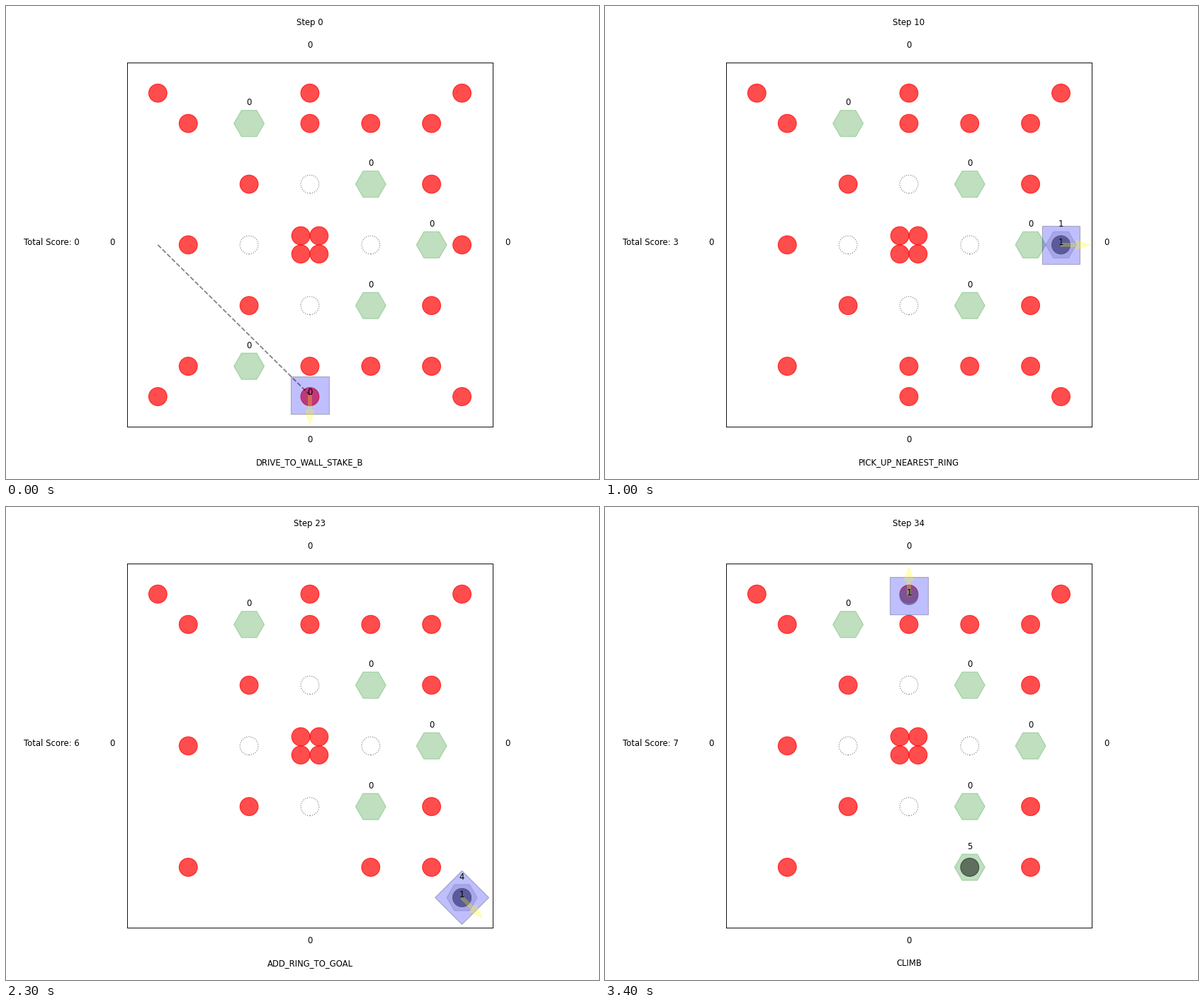
A matplotlib script for the animation above (3500 ms loop, 837 by 669 pixels).

```python
import matplotlib.pyplot as plt
import numpy as np
from matplotlib.animation import FuncAnimation
from matplotlib.patches import Circle, FancyArrow, Rectangle, RegularPolygon

W, H, DPI = 837, 669, 83.7
HALF = 6        # half the field side, in feet
WALL = 4.95     # where the robot stops in front of a wall
SIDE = 1.25
RING_R = 0.3
CLEARANCE = 1.37

RINGS = [(-5, 5), (0, 5), (5, 5), (-4, 4), (0, 4), (2, 4), (4, 4),
         (-2, 2), (4, 2), (-4, 0), (5, 0), (-2, -2), (4, -2),
         (-4, -4), (0, -4), (2, -4), (4, -4), (-5, -5), (0, -5), (5, -5),
         (-.3, .3), (.3, .3), (-.3, -.3), (.3, -.3)]
GOALS = [(-2, 4), (2, 2), (4, 0), (2, -2), (-2, -4)]
POLES = [(2, 0), (0, 2), (-2, 0), (0, -2)]
STEP = {"L": (-1, 0), "R": (1, 0), "T": (0, 1), "B": (0, -1)}

RING, GOAL = "PICK_UP_NEAREST_RING", "PICK_UP_NEAREST_GOAL"
ADD, ADD_WALL = "ADD_RING_TO_GOAL", "ADD_RING_TO_WALL_STAKE"
DROP, CLIMB = "DROP_GOAL", "CLIMB"


def wall(side):
    return "DRIVE_TO_WALL_STAKE_" + side


def corner(name):
    return "DRIVE_TO_CORNER_" + name


PLAN = [
    wall("B"), GOAL, corner("BR"), corner("TR"), wall("T"), corner("TL"),
    corner("BL"), RING, ADD, wall("R"), RING, wall("B"), wall("L"), ADD,
    wall("B"), RING, RING, wall("L"), wall("B"), wall("R"), corner("BR"),
    RING, ADD, ADD, ADD, DROP, GOAL, wall("B"), corner("BR"), wall("B"),
    ADD_WALL, RING, DROP, wall("T"), CLIMB,
]


def cross(a, b):
    return a[0] * b[1] - a[1] * b[0]


def heading(v):
    return np.arctan2(v[1], v[0])


def route(start, end):
    """Straight path, or the shortest one round the outside of a pole."""
    p, q = np.array(start, float), np.array(end, float)
    v = q - p
    for pole in POLES:
        c = np.array(pole, float)
        t = np.clip(np.dot(c - p, v) / np.dot(v, v), 0, 1)
        if np.hypot(*(p + t * v - c)) < CLEARANCE - 0.17:
            turn = np.sign(cross(v, -p))
            a = heading(p - c) + turn * np.arccos(CLEARANCE / np.hypot(*(p - c)))
            b = heading(q - c) - turn * np.arccos(CLEARANCE / np.hypot(*(q - c)))
            sweep = (turn * (b - a)) % (2 * np.pi)
            arc = a + turn * np.linspace(0, sweep, 30)
            bend = c + CLEARANCE * np.column_stack([np.cos(arc), np.sin(arc)])
            return np.vstack([p, bend, q])
    return np.vstack([p, q])


def simulate():
    pos, angle, held, score = (-5, 0), 0.0, 0, 0
    rings = list(RINGS)
    goals = [[g, 0] for g in GOALS]
    carried = None
    states = []

    def nearest(points):
        return min(points, key=lambda p: np.hypot(p[0] - pos[0], p[1] - pos[1]))

    def face(target):
        d = np.subtract(target, pos)
        return heading(d) if np.any(d) else angle

    for action in PLAN:
        path = None
        if action.startswith("DRIVE"):
            d = np.sum([STEP[s] for s in action.rsplit("_", 1)[1]], axis=0)
            end = tuple(WALL * d)
            path = route(pos, end)
            pos, angle = end, heading(d)
        elif action == RING:
            ring = nearest(rings)
            angle, pos = face(ring), ring
            rings.remove(ring)
            held += 1
        elif action == GOAL:
            spot = nearest([g[0] for g in goals])
            angle, pos = face(spot), spot
            goal = next(g for g in goals if g[0] == spot)
            goals.remove(goal)
            carried = goal[1]
        elif action == ADD:
            score += 1 if carried else 3
            carried += 1
            held -= 1
        elif action == DROP:
            goals.append([pos, carried])
            carried = None
        states.append(dict(action=action, path=path, pos=pos, angle=angle,
                           held=held, score=score, rings=list(rings),
                           goals=[tuple(g) for g in goals], carried=carried))
    return states


STATES = simulate()

fig, ax = plt.subplots(figsize=((W + 1e-3) / DPI, (H + 1e-3) / DPI), dpi=DPI)


def label(x, y, text):
    ax.text(x, y, text, ha="center", fontsize=10, family="DejaVu Sans")


def disc(pos, color, alpha):
    ax.add_patch(Circle(pos, RING_R, color=color, alpha=alpha))


def draw_goal(pos, count, color):
    ax.add_patch(RegularPolygon(pos, 6, radius=0.5, orientation=np.pi / 6,
                                color=color, alpha=0.25))
    if count:
        disc(pos, "black", 0.5)
    label(pos[0], pos[1] + 0.6, count)


def draw_robot(s):
    x, y = s["pos"]
    if s["carried"] is not None:
        draw_goal(s["pos"], s["carried"], "gray")
    if s["held"]:
        disc(s["pos"], "gray", 0.7)
    ax.add_patch(Rectangle((x - SIDE / 2, y - SIDE / 2), SIDE, SIDE,
                           angle=np.degrees(s["angle"]), rotation_point="center",
                           facecolor="blue", edgecolor="black", alpha=0.25))
    ax.add_patch(FancyArrow(x, y, 0.5 * np.cos(s["angle"]), 0.5 * np.sin(s["angle"]),
                            width=0.1, color="yellow", alpha=0.25))
    label(x, y, s["held"])


def draw(i):
    s = STATES[i]
    ax.clear()
    ax.set(xlim=(-HALF, HALF), ylim=(-HALF, HALF), xticks=[], yticks=[], aspect="equal")
    for ring in s["rings"]:
        disc(ring, "red", 0.7)
    for pos, count in s["goals"]:
        draw_goal(pos, count, "green")
    for pole in POLES:
        ax.add_patch(Circle(pole, RING_R, fill=False, edgecolor="black",
                            linestyle=":", alpha=0.5))
    draw_robot(s)
    if s["path"] is not None:
        ax.plot(*s["path"].T, "k--", alpha=0.5)
    for dx, dy in STEP.values():
        label(6.5 * dx, 6.5 * dy, 0)
    label(0, 7.25, f"Step {i}")
    label(0, -7.25, s["action"])
    label(-8.5, 0, f"Total Score: {s['score']}")
    return []


anim = FuncAnimation(fig, draw, frames=len(PLAN), interval=100,
                     repeat=True, repeat_delay=0, blit=False)
plt.show()
```
